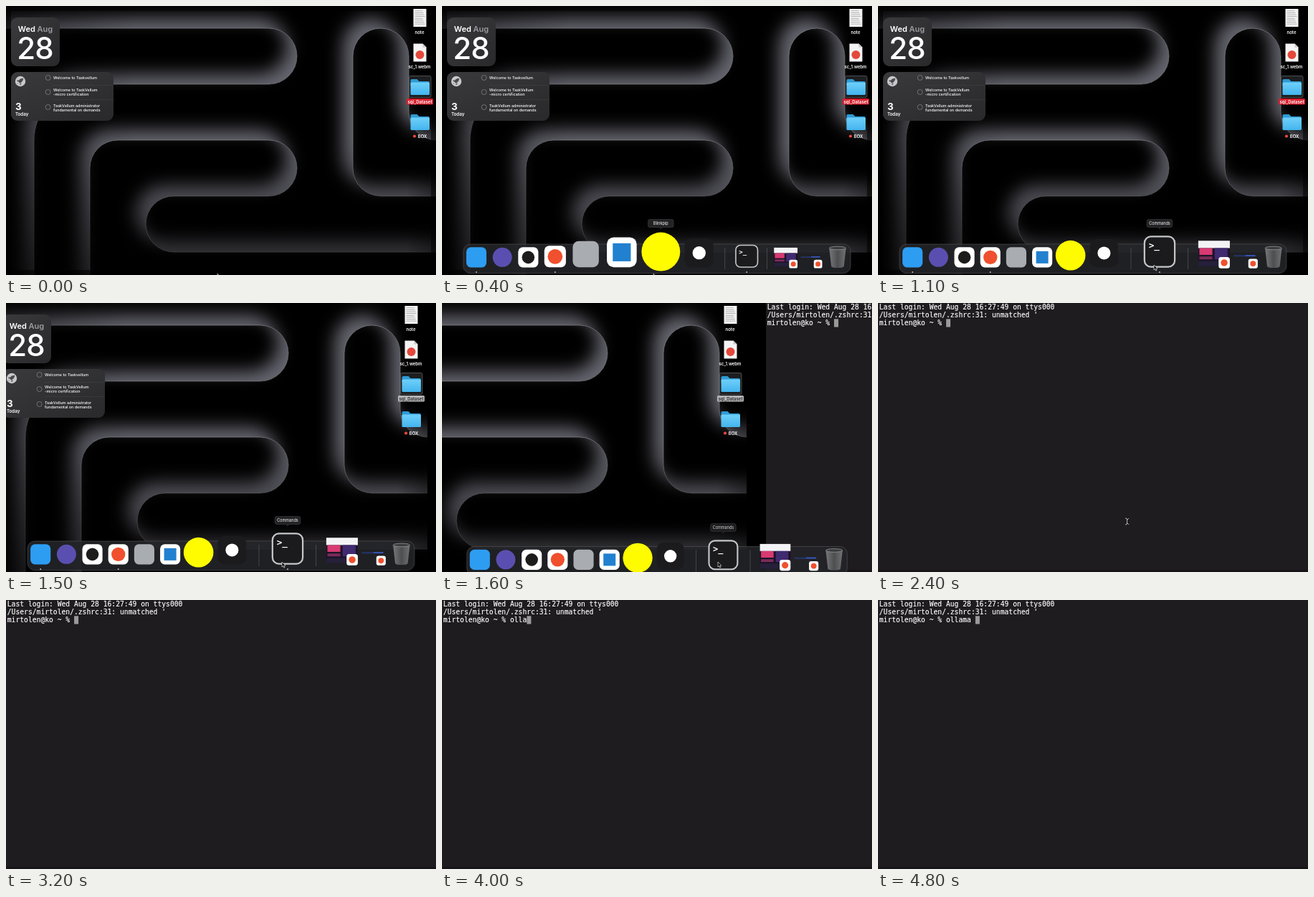
Recreate the animation shown at these times as an HTML page. Size 600x375 px, loop 5000 ms.

```html
<!DOCTYPE html>
<html lang="en">
<head>
<meta charset="utf-8">
<title>Desktop</title>
<style>
  html, body { margin: 0; width: 100%; height: 100%; overflow: hidden; background: #000; }
  svg { display: block; width: 100vw; height: 100vh; }
  text { font-family: Inter, "Open Sans", sans-serif; fill: #fff; white-space: pre; }
  .mono text { font: 9.69px "DejaVu Sans Mono", monospace; stroke: #fff; stroke-width: .15px; }
  .label { font-size: 6px; font-weight: 600; text-anchor: middle; }
  .todo { font-size: 5.4px; font-weight: 500; }
</style>
</head>
<body>
<svg id="stage" viewBox="0 0 600 375" xmlns="http://www.w3.org/2000/svg">
  <defs>
    <filter id="soft" filterUnits="userSpaceOnUse" x="-200" y="-100" width="1000" height="700" color-interpolation-filters="sRGB"><feGaussianBlur stdDeviation="12"/></filter>
    <linearGradient id="dimDown" x1="0" y1="0" x2="0" y2="1"><stop offset=".5" stop-opacity="0"/><stop offset="1" stop-opacity=".6"/></linearGradient>
    <linearGradient id="dimSides"><stop offset="0" stop-opacity=".45"/><stop offset=".3" stop-opacity="0"/><stop offset=".93" stop-opacity="0"/><stop offset="1" stop-opacity=".4"/></linearGradient>
    <linearGradient id="panel" x1="0" y1="0" x2="1" y2="1"><stop offset="0" stop-color="#3a3a3d"/><stop offset="1" stop-color="#29292b"/></linearGradient>
    <linearGradient id="folder" x1="0" y1="0" x2="0" y2="1"><stop offset="0" stop-color="#6fd0fa"/><stop offset="1" stop-color="#43b4ee"/></linearGradient>
    <linearGradient id="bin" x1="0" x2="1"><stop offset="0" stop-color="#76787a"/><stop offset=".5" stop-color="#4c4e50"/><stop offset="1" stop-color="#707274"/></linearGradient>
  </defs>
  <g id="desk"></g>
  <g id="shell" class="mono"></g>
  <g id="dock"></g>
  <g id="pointer"></g>
</svg>
<script>
const $ = id => document.getElementById(id);
const rect = (x, y, w, h, fill, r = 0, more = '') =>
  `<rect x="${x}" y="${y}" width="${w}" height="${h}" rx="${r}" fill="${fill}" ${more}/>`;
const circle = (x, y, r, fill, more = '') => `<circle cx="${x}" cy="${y}" r="${r}" fill="${fill}" ${more}/>`;
const path = (d, fill, more = '') => `<path d="${d}" fill="${fill}" ${more}/>`;
const text = (x, y, s, more = '') => `<text x="${x}" y="${y}" ${more}>${s}</text>`;
const repeat = (n, f) => Array.from({ length: n }, (_, i) => f(i)).join('');

// Linear interpolation through [time, value] pairs, held at both ends.
function track(keys, t) {
  const i = keys.findIndex(k => k[0] > t);
  if (i === 0) return keys[0][1];
  if (i < 0) return keys[keys.length - 1][1];
  const [t0, a] = keys[i - 1], [t1, b] = keys[i];
  return a + (b - a) * (t - t0) / (t1 - t0);
}

// Wallpaper: black slabs whose edges glow on their upper left side.
const slabs = [
  'M-150 31H367a39 39 0 0 1 0 78H118a79 79 0 0 0-79 79V550H-150Z',
  'M117 550V226a39 39 0 0 1 39-39H367a39 39 0 0 1 0 78H234a39 39 0 0 0 0 78H750V550Z',
  'M750 265H523a39 39 0 0 1-39-39V70a39 39 0 0 1 78 0V148a39 39 0 0 0 39 39H750Z'
];
const GLOW = '#666670';
const shifted = (d, fill) => path(d, fill, 'transform="translate(-14 -14)" filter="url(#soft)"');

function wallpaper() {
  const clips = slabs.map((d, i) => `<clipPath id="slab${i}"><path d="${d}"/></clipPath>`).join('');
  return clips + rect(0, 0, 600, 375, '#000') +
    slabs.map(d => shifted(d, GLOW)).join('') +
    slabs.map((d, i) => `<g clip-path="url(#slab${i})">${path(d, GLOW)}${shifted(d, '#000')}</g>`).join('') +
    slabs.map(d => path(d, 'none', 'stroke="#8d8d94" stroke-width=".6"')).join('') +
    rect(0, 0, 600, 375, 'url(#dimDown)') + rect(0, 0, 600, 375, 'url(#dimSides)') +
    rect(600, 0, 200, 375, '#000');
}

const border = path('M0 0H600V375H0ZM7 7V368H593V7Z', '#000', 'fill-rule="evenodd" opacity=".55"');

function widgets() {
  const todos = [[100, 102, 'Welcome to Taskvellum'],
    [120, 119, 'Welcome to TaskVellum', '-micro certification'],
    [141, 141, 'TaskVellum administrator', 'fundamental on demands']];
  return rect(7, 16, 68, 68, 'url(#panel)', 9) +
    text(41, 36, 'Wed <tspan fill="#9b9ba0">Aug</tspan>', 'text-anchor="middle" font-size="11" font-weight="600"') +
    text(40.5, 74, '28', 'text-anchor="middle" font-size="42" font-weight="500" letter-spacing="-.8"') +
    rect(7, 92, 143, 68, 'url(#panel)', 9) +
    circle(20, 105, 7.2, '#c9c9cc') +
    path('M24 101q-5 0-7 4l2.500 2.500q4-2 4.500-6.500M17.500 104.500l-2 .500 1-2ZM20 108l-.500 2 2-1.500ZM17 107l-1.500 1.800', '#4a4a4e', 'stroke="#4a4a4e" stroke-width=".5"') +
    text(13, 145, '3', 'font-size="13.500" font-weight="700"') +
    text(13, 153.3, 'Today', 'font-size="6.200" font-weight="600"') +
    rect(66, 110, 84, .4, '#4a4a4d') + rect(66, 130.5, 84, .4, '#4a4a4d') +
    todos.map(([cy, y, ...lines]) =>
      circle(58.6, cy, 3.5, 'none', 'stroke="#8c8c90" stroke-width=".7"') +
      lines.map((s, i) => text(66, y + i * 5.8, s, 'class="todo"')).join('')).join('');
}

const folder = y =>
  path(`M564.500 ${y + 2}q0-2 2-2h7l3 3h12.500q2 0 2 2v4h-26.500Z`, '#2f9ad4') +
  rect(564.5, y + 4.5, 26.5, 17.5, 'url(#folder)', 1.6);

function deskIcons(active) {
  return rect(568.5, 4, 18, 25, '#f2f2f2') +
    repeat(8, i => rect(570.5, 6.5 + i * 2.6, 11 + (i * 5) % 4, .7, '#9a9a9a')) +
    text(577, 39, 'note', 'class="label"') +
    path('M568.500 52.500h13l5 5v20h-18Z', '#f4f4f4') + path('M581.500 52.500v5h5Z', '#c8c8c8') +
    circle(577.5, 68, 6, '#e3483b') +
    text(577, 87, 'sc_1.webm', 'class="label"') +
    rect(562.5, 97.5, 30.5, 30, '#1d1e20', 2, 'stroke="#68696c" stroke-width=".7"') + folder(102) +
    rect(559, 129, 37, 8.6, active ? '#d9202f' : '#b4b4b6', 1.6) +
    text(577.5, 135.5, 'sql_Dataset', `class="label" style="fill:${active ? '#fff' : '#2a2a2c'}"`) +
    folder(151) + circle(570, 181.5, 2.1, '#f0473f') +
    text(581, 184, 'BOX', 'class="label"');
}

// Dock art lives in a 100 x 100 box centred on the origin.
const tile = (fill, inner = '') => rect(-48, -48, 96, 96, fill, 22) + inner;
const badge = (x, y) => rect(x - 20, y - 20, 40, 40, '#fff', 9) + circle(x, y, 12, '#f0502d');
const items = [
  { art: tile('#2d9df2'), open: true },
  { art: circle(0, 0, 46, '#5a4fb0') },
  { art: tile('#fff', circle(0, 0, 30, '#1c1c1c')) },
  { art: tile('#fff', circle(0, 0, 33, '#f0502d')), open: true },
  { art: tile('#a9acb0') },
  { art: tile('#fff', rect(-29, -29, 58, 58, '#2180cf')) },
  { art: circle(0, 0, 60, '#fffc00'), name: 'Blinkpip' },
  { art: tile('#1b1b1d', circle(0, 0, 22, '#fff')), name: 'TV' },
  { gap: true },
  { art: rect(-47, -47, 94, 94, '#1b1b1d', 20, 'stroke="#c4c6c8" stroke-width="5"') +
      text(-34, -9, '&gt;_', 'style="font:700 28px \'DejaVu Sans Mono\',monospace"'), name: 'Commands', open: true },
  { gap: true },
  { art: rect(-56, -46, 112, 90, '#1d1328') + rect(-56, -46, 112, 26, '#f3f3f5') +
      rect(-52, -20, 46, 24, '#d83a72') + rect(2, -20, 46, 40, '#402a70') + rect(-52, 10, 46, 10, '#7a2c58') +
      rect(-56, 26, 70, 18, '#26203a') + badge(36, 32) },
  { art: rect(-52, -4, 92, 6, '#26356b') + rect(-2, -4, 42, 4, '#3f63d8') + badge(30, 32) },
  { art: path('M-40-44L-30 42Q-28 50 0 50T30 42L40-44Z', 'url(#bin)') +
      `<ellipse cy="-44" rx="40" ry="8" fill="#3a3c3e" stroke="#8f9193" stroke-width="3"/>` }
];
const REST = 29.3, GROW = 15.7, FLOOR = 365;

// Slot sizes follow a cosine bump around the pointer; the row stays centred.
function layout(px, zoom) {
  let left = 30, slots;
  for (let pass = 0; pass < 4; pass++) {
    let edge = left;
    slots = items.map(item => {
      let size = REST, x, slot;
      for (let k = 0; k < 4; k++) {
        slot = size * (item.gap ? .555 : 1.235);
        x = edge + slot / 2;
        const d = Math.abs(x - px);
        size = REST + (d < 150 ? GROW * zoom * Math.cos(Math.PI * d / 300) : 0);
      }
      edge += slot;
      return { ...item, x, size };
    });
    slots.left = left;
    slots.width = edge - left;
    left = 300 - slots.width / 2;
  }
  return slots;
}

function tooltip(item, opacity) {
  const w = item.name.length * 3.2 + 10, y = FLOOR - item.size - 22.5;
  return `<g opacity="${opacity}">` +
    rect(item.x - w / 2, y, w, 11, '#232325', 2.5, 'stroke="#4c4c50" stroke-width=".5"') +
    path(`M${item.x - 3} ${y + 11}h6l-3 3Z`, '#232325') +
    text(item.x, y + 7.5, item.name, 'text-anchor="middle" font-size="5.500"') + '</g>';
}

function dock(px, zoom) {
  const slots = layout(px, zoom);
  const hit = slots.filter(s => s.name)
    .find(s => Math.abs(s.x - px) < s.size * .63);
  return rect(slots.left, 332, slots.width, 40.5, '#242528', 10,
      'fill-opacity=".88" stroke="#55565a" stroke-width=".6"') +
    slots.map(s => s.gap
      ? rect(s.x - .3, 337, .6, 30, '#5d5e62')
      : `<g transform="translate(${s.x} ${FLOOR - s.size / 2}) scale(${s.size / 100})">${s.art}</g>` +
        (s.open ? circle(s.x, 371, .9, '#c5c5c8') : '')).join('') +
    (hit ? tooltip(hit, zoom) : '');
}

const arrow = (x, y) =>
  path(`M${x} ${y}v7l1.600-1.500 1.200 2.600 1.100-.500-1.200-2.500h2.200Z`, '#000', 'stroke="#fff" stroke-width=".6"');
const beam = (x, y) =>
  path(`M${x} ${y}q2.500 0 2.500 1.500t2.500-1.500M${x} ${y + 9}q2.500 0 2.500-1.500t2.500 1.500M${x + 2.5} ${y + 1}v7`,
    'none', 'stroke="#ddd" stroke-width=".8"');

const slide = [[1400, 0], [1500, 12], [1600, 175], [1700, 538], [1800, 627]];
const dockDrop = [[100, 60], [200, 26], [300, 5], [400, 0], [1500, 0], [1600, 7.5], [1700, 30], [1800, 70]];
const dockZoom = [[100, 0], [300, .9], [400, 1], [1500, 1], [1600, .84], [1700, .37], [1800, 0]];
const pointerX = [[400, 295], [700, 315], [800, 325], [1100, 385], [2300, 385], [2400, 345], [2500, 280], [2600, 256]];
const pointerY = [[700, 373], [1100, 361], [2300, 361], [2400, 300], [2500, 225], [2600, 192]];
const keyTimes = [3300, 3500, 3600, 4000, 4200, 4300, 4800];
const CHAR = 5.83, command = 'ollama ', prompt = 'mirtolen@ko ~ % ';

function shell(t) {
  const typed = command.slice(0, keyTimes.filter(k => k <= t).length);
  const line = prompt + typed;
  return rect(0, 0, 600, 375, '#1e1c1e') + rect(0, 372, 600, 3, '#171517') +
    ['Last login: Wed Aug 28 16:27:49 on ttys000', "/Users/mirtolen/.zshrc:31: unmatched '", line]
      .map((s, i) => text(1.8, 8.9 + i * 11.1, s)).join('') +
    rect(1.8 + CHAR * line.length, 22.3, 6, 11.2, '#9b9a9b');
}

$('desk').innerHTML = wallpaper() + '<g id="border"></g>' + widgets() + '<g id="icons"></g>';
$('border').innerHTML = border;

function draw(t) {
  const shift = track(slide, t), drop = track(dockDrop, t);
  const px = track(pointerX, t), py = track(pointerY, t);
  $('desk').setAttribute('transform', `translate(${-shift} 0)`);
  $('desk').style.display = shift < 627 ? '' : 'none';
  $('border').style.display = t < 1400 ? '' : 'none';
  $('icons').innerHTML = deskIcons(t < 1400);
  $('shell').setAttribute('transform', `translate(${627 - shift} 0)`);
  $('shell').innerHTML = shell(t);
  $('dock').setAttribute('transform', `translate(0 ${drop})`);
  $('dock').innerHTML = drop < 60 ? dock(px, track(dockZoom, t)) : '';
  $('pointer').innerHTML = t >= 3200 ? '' : t >= 2400 ? beam(px, py) : arrow(px, py);
}

// The picture advances in steps of a tenth of a second.
const LOOP = 5000, STEP = 100, start = performance.now();
let shown = -1;
function tick() {
  const t = Math.floor((performance.now() - start) % LOOP / STEP) * STEP;
  if (t !== shown) draw(shown = t);
  requestAnimationFrame(tick);
}
tick();
</script>
</body>
</html>
```
